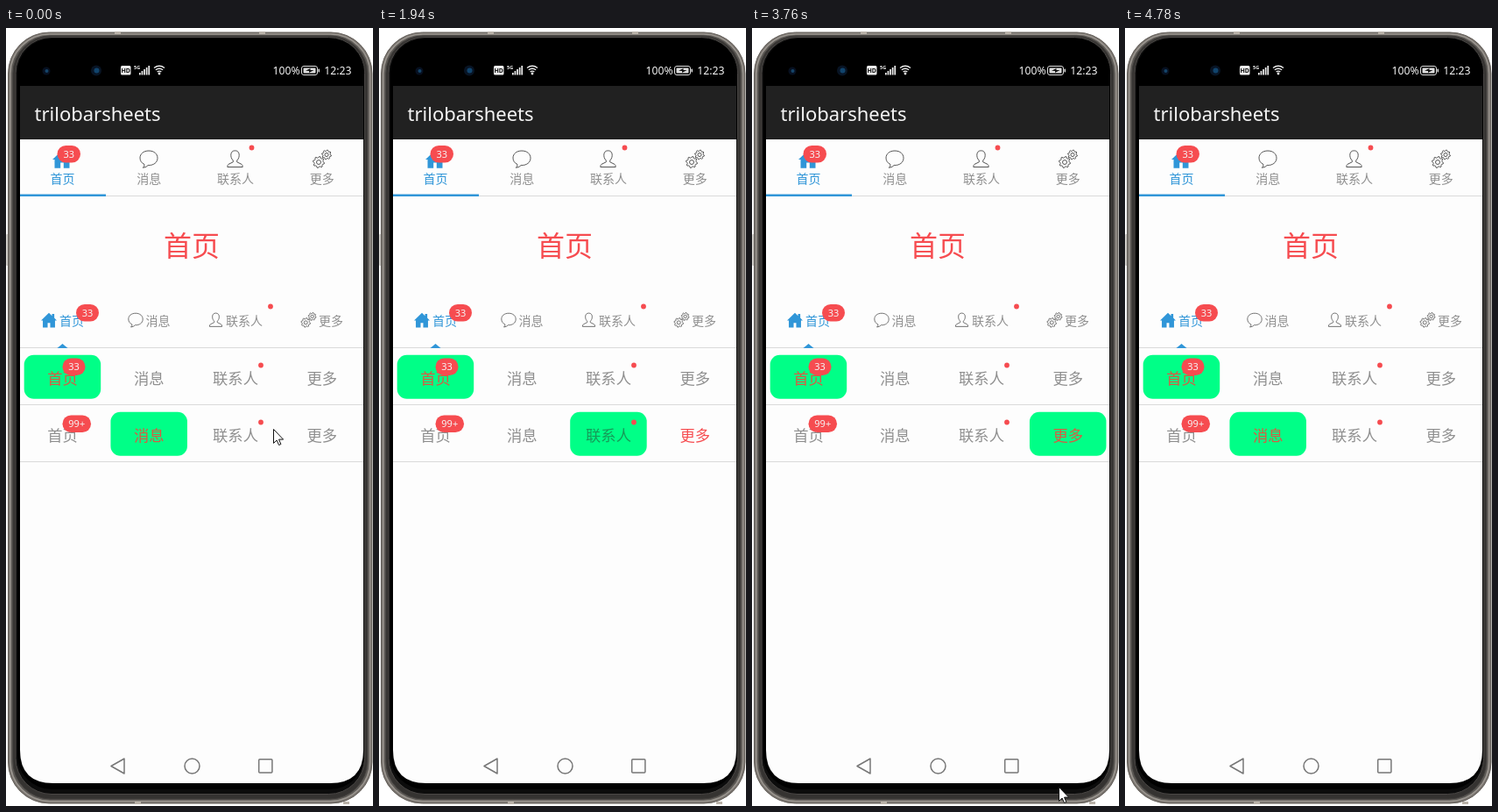
An HTML page that plays this animation: 419x887 px, repeating every 5290 ms.

```html
<!DOCTYPE html>
<html lang="zh">
<head>
<meta charset="utf-8">
<title>Tabs</title>
<style>
  html, body { margin: 0; width: 100%; height: 100%; overflow: hidden; background: #fff; }
  svg { display: block; width: 419px; height: 887px; }
  text { font-family: "Noto Sans CJK SC", "Noto Sans CJK", "Noto Sans", sans-serif; }
  .mid { text-anchor: middle; }
  .latin { font-family: "Noto Sans", sans-serif; fill: #f4f4f4; }
  .line { fill: none; stroke: #555; stroke-linejoin: round; }
  .nav { fill: none; stroke: #777; stroke-width: 1.5; stroke-linejoin: round; }
</style>
</head>
<body>
<svg id="stage" viewBox="0 0 419 887"></svg>
<script>
const RED = '#f64c50', BLUE = '#3096d8', GREEN = '#00ff87', GRAY = '#8f8f8f';
const RED_ON_GREEN = '#d95a42', GRAY_ON_GREEN = '#169a58';
const LABELS = ['首页', '消息', '联系人', '更多'];
const PITCH = 98.75, FIRST = 64.5, BLOCK = 87.5, BLOCK_X = 20.7, LOOP = 5290;
const tabX = i => FIRST + i * PITCH;

const rect = (x, y, w, h, r, fill, extra = '') =>
  `<rect x="${x}" y="${y}" width="${w}" height="${h}" rx="${r}" fill="${fill}" ${extra}/>`;
const dot = (x, y, r = 2.9, fill = RED) => `<circle cx="${x}" cy="${y}" r="${r}" fill="${fill}"/>`;
const path = (d, attrs) => `<path d="${d}" ${attrs}/>`;
// y is the middle of the ideographs
const label = (s, x, y, size, fill = GRAY, attrs = '') =>
  `<text class="mid" x="${x}" y="${y + size * .38}" font-size="${size}" style="fill:${fill}" ${attrs}>${s}</text>`;
const latin = (s, x, y, size, attrs = '') =>
  `<text class="latin" x="${x}" y="${y}" font-size="${size}" ${attrs}>${s}</text>`;
const badge = (s, x, y, w) => rect(x, y, w, 19.5, 9.75, RED) +
  latin(s, x + w / 2, y + 13.8, 11, 'text-anchor="middle" font-weight="500"');
const rule = y => rect(16, y, 392, 1, 0, '#dadada');
const greenBlock = (y, attrs = '') => rect(BLOCK_X, y, BLOCK, 50, 11, GREEN, attrs);

function gear(cx, cy, r, teeth) {
  const points = [];
  for (let i = 0; i < teeth * 4; i++) {
    const a = (i + .5) / (teeth * 4) * 2 * Math.PI;
    const d = i % 4 < 2 ? r : r * .77;
    points.push((cx + d * Math.cos(a)).toFixed(1) + ' ' + (cy + d * Math.sin(a)).toFixed(1));
  }
  return path(`M${points.join('L')}Z`, 'class="line"') +
    `<circle cx="${cx}" cy="${cy}" r="${r * .38}" class="line"/>`;
}

// icons sit in a 22 by 22 box
const ICONS = [
  path('M11 1L0 11.5H2.5V21.3H9.2V15H12.8V21.3H19.5V11.5H22L18.5 8V2.5H15.3V5.1Z', `fill="${BLUE}"`),
  path('M11 1.5C5 1.5 1 5 1 9.7C1 13 3 15.7 6 17Q6.3 19 4.4 20.8Q8.5 20.3 10.2 18C16.5 18.3 21 14.8 21 9.9C21 5 17 1.5 11 1.5Z', 'class="line"'),
  path('M11 1.3C7.7 1.3 6 3.7 6.3 7C6.5 10 7.7 11.3 8.8 12.5V14.3L3.6 16.8Q2.3 17.7 2.3 20H19.7Q19.7 17.7 18.4 16.8L13.2 14.3V12.5C14.3 11.3 15.5 10 15.7 7C16 3.7 14.3 1.3 11 1.3Z', 'class="line"'),
  gear(7, 14.5, 6.5, 8) + gear(16, 6, 5.4, 8)
];
const icon = (i, x, y, size) => `<g transform="translate(${x} ${y}) scale(${size / 22})">${ICONS[i]}</g>`;

function phone() {
  return `<defs><clipPath id="screen">
      <path d="M16 60H408V823Q408 861 370 861H54Q16 861 16 823Z"/></clipPath></defs>` +
    rect(0, 235, 3, 36, 1, '#cfccc8') +
    rect(2.5, 5, 415.5, 879, 47, '#77726d', 'stroke="#67625d"') +
    rect(5, 7, 410.5, 874.5, 45, '#5c5955', 'stroke="#9a958f" stroke-width="1.5"') +
    rect(8, 9, 404.5, 870, 43, '#353331', 'stroke="#3f3c3a"') +
    rect(11, 10.5, 398.5, 863, 41, '#0c0c0c', 'stroke="#4a4745"') +
    rect(13, 12, 396, 856, 39, '#000') +
    [[124, 4], [289, 4], [147, 882], [385, 882]].map(([x, y]) => rect(x, y, 7, 3, 0, '#b9b2a9')).join('');
}

function statusBar() {
  const bars = [0, 1, 2, 3, 4].map(i => rect(152 + i * 2.6, 51 - i * 2, 1.7, 2.5 + i * 2, 0, '#eee')).join('');
  const waves = [3, 5.2, 7.5].map(r =>
    path(`M${175 - r * .8} ${53 - r}Q175 ${53 - r * 1.6} ${175 + r * .8} ${53 - r}`, 'fill="none" stroke="#eee" stroke-width="1.4"')).join('');
  return dot(46, 49, 4.5, '#071020') + dot(46.5, 49, 2, '#154468') +
    dot(103, 48.5, 6, '#081424') + dot(103.5, 48.5, 3, '#11446c') +
    rect(131, 43, 11.5, 10.5, 1.5, '#eee') +
    latin('HD', 136.7, 51, 7, 'text-anchor="middle" font-weight="700" style="fill:#111"') +
    latin('5G', 146, 47, 5.5, 'font-weight="700"') + bars + waves + dot(175, 52, 1.4, '#eee') +
    latin('100%', 304.5, 53, 12.2) + latin('12:23', 363.3, 53, 12.2) +
    rect(337.5, 43.5, 18, 10, 2.5, 'none', 'stroke="#ddd"') + rect(339.5, 45.5, 14, 6, 1, '#ddd') +
    rect(356.5, 46.5, 1.5, 4, .7, '#ddd') + path('M342 48.8L347.5 46V48H351.5L346 51V49Z', 'fill="#111"');
}

function content() {
  const color = i => i ? GRAY : BLUE;
  const weight = i => i ? '' : 'font-weight="500"';
  const topIcons = [53, 152, 250.5, 350].map((x, i) => icon(i, x, 138.5, 22)).join('');
  const topLabels = LABELS.map((s, i) => label(s, tabX(i), 172, 14, color(i), weight(i))).join('');
  const sideIcons = [40, 139, 230.5, 336.5].map((x, i) => icon(i, x, 324, 18)).join('');
  const sideLabels = LABELS.map((s, i) => label(s, [75, 173.5, 272, 371][i], 333.3, 14, color(i), weight(i))).join('');
  const blockLabels = LABELS.map((s, i) => label(s, tabX(i), 399, 17.3, i ? GRAY : RED_ON_GREEN, weight(i))).join('');
  const liveLabels = LABELS.map((s, i) => label(s, tabX(i), 464, 17.3, GRAY, 'data-live')).join('');
  return rect(16, 66, 392, 61, 0, '#212121') + latin('trilobarsheets', 32.5, 106, 22) +
    rect(16, 127, 392, 740, 0, '#fdfdfd') +
    topIcons + topLabels + rule(191) + rect(16, 189.5, 98, 2.5, 0, BLUE) +
    badge('33', 58.5, 134, 26.5) + dot(280.5, 136.5) +
    label('首页', 212, 248, 32, RED, 'font-weight="500"') +
    sideIcons + sideLabels + badge('33', 80, 315, 26) + dot(302, 317.5) +
    rule(364) + path('M58.5 365L64.5 360L70.5 365Z', `fill="${BLUE}"`) +
    greenBlock(372.7) + blockLabels + badge('33', 64.5, 376.5, 26) + dot(291, 384.5) +
    rule(429) +
    greenBlock(437.7, 'id="block"') + liveLabels + badge('99+', 64.5, 441.5, 32.5) + dot(291, 449.5) +
    rule(494) +
    path('M120 841.5L135 833V850Z', 'class="nav"') + '<circle cx="212.5" cy="841.5" r="8.5" class="nav"/>' +
    rect(288.7, 833.7, 15.2, 15.2, 1, 'none', 'class="nav"');
}

const stage = document.getElementById('stage');
stage.innerHTML = phone() + statusBar() + `<g clip-path="url(#screen)">${content()}</g>` +
  path('M.5 .5V16.4L4.1 13L6.6 18.5L8.9 17.5L6.5 12.1H11.6Z', 'id="cursor" fill="#fff" stroke="#111"');

const block = document.getElementById('block');
const cursor = document.getElementById('cursor');
const live = [...stage.querySelectorAll('[data-live]')];

// [ms, x, y]; no position means hidden
const CURSOR = [
  [0, 305, 457], [150, 312, 457], [270, 326, 456], [390, 339, 455], [510, 347, 455], [660, 348, 455],
  [1420], [2210, 296, 465], [2370, 292, 466], [2520, 262, 472], [2640, 225, 476], [2760, 185, 476],
  [2880, 155, 475], [3000, 143, 474], [3370, 188, 508], [3490, 251, 559], [3640, 300, 690],
  [3760, 350, 865], [3880]
];
// [ms, position in tabs]
const BLOCKS = [
  [0, 1], [660, 1.46], [780, 1.96], [900, 2.08], [1020, 2], [2210, 3.12], [2370, 3],
  [4420, 2.08], [4540, 1.08], [4660, .84], [4780, 1]
];
// [ms, selected tab]
const SELECTED = [[0, 1], [390, 2], [1940, 3], [4030, 1]];

const at = (table, t) => table.findLast(row => row[0] <= t);

function draw(t) {
  const [, x, y] = at(CURSOR, t), pos = at(BLOCKS, t)[1], selected = at(SELECTED, t)[1];
  cursor.style.display = x === undefined ? 'none' : '';
  if (x !== undefined) cursor.setAttribute('transform', `translate(${x} ${y})`);
  block.setAttribute('x', BLOCK_X + pos * PITCH);
  live.forEach((el, i) => {
    const covered = Math.abs(pos - i) < .5;
    const active = i === selected;
    el.style.fill = active ? (covered ? RED_ON_GREEN : RED) : (covered ? GRAY_ON_GREEN : GRAY);
    el.style.fontWeight = active ? 500 : 400;
  });
}

const start = performance.now();
function tick() {
  draw((performance.now() - start) % LOOP);
  requestAnimationFrame(tick);
}
tick();
</script>
</body>
</html>
```
